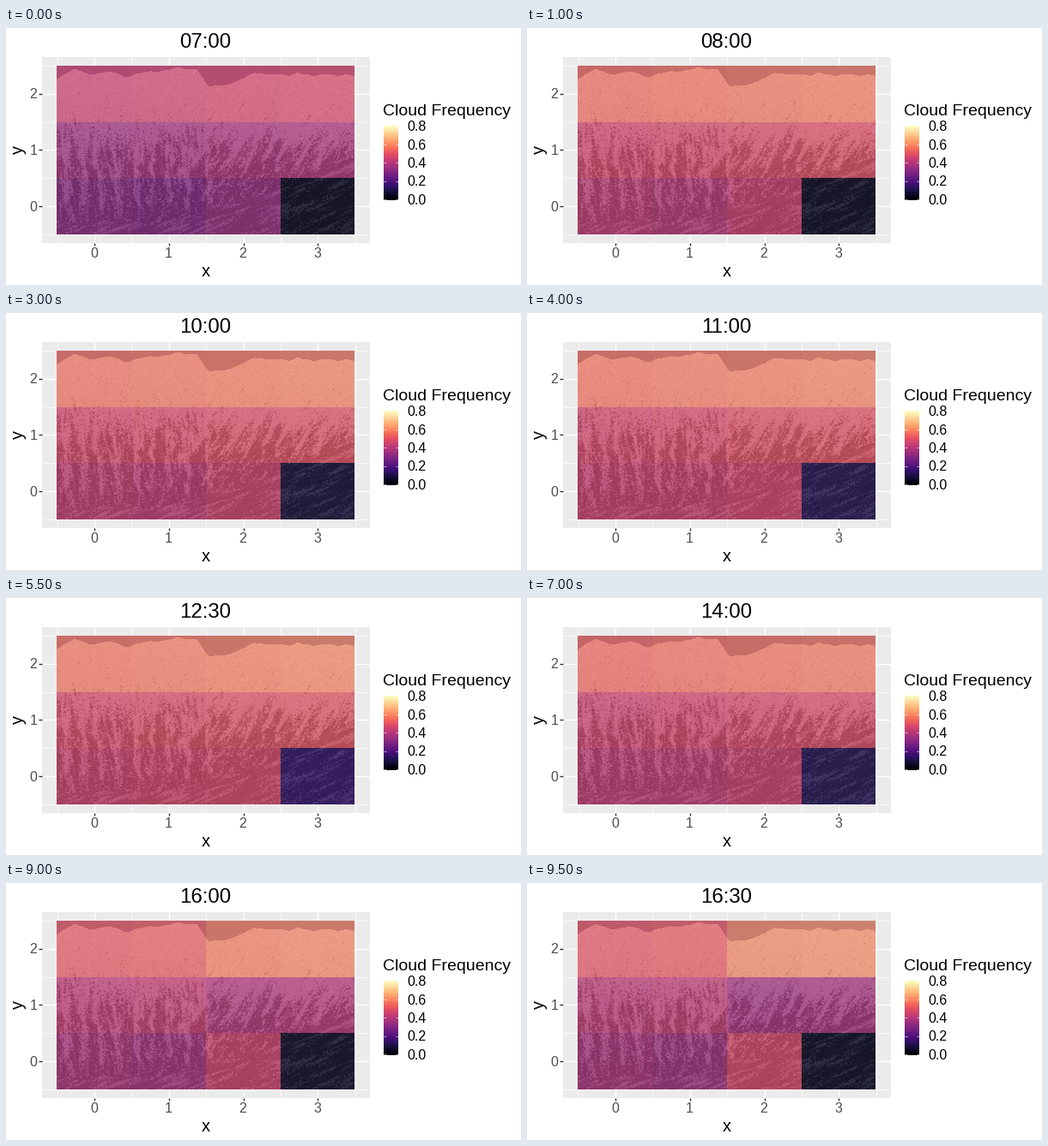
A matplotlib script for the animation above (10000 ms loop, 600x300 px).

```python
import numpy as np
import matplotlib
import matplotlib.pyplot as plt
from matplotlib.animation import FuncAnimation

W, H, DPI = 600, 300, 100
PX = 72 / DPI                      # points per pixel
FRAMES, INTERVAL = 20, 500
LEFT, TOP, COLS, ROWS = 59, 44, 347, 197
CELL_W, CELL_H = 86.8, 65.6
ALPHA = 0.7

plt.rcParams["font.family"] = "Liberation Sans"
magma = matplotlib.colormaps["magma"]
rng = np.random.default_rng(7)

x = np.arange(COLS)[None, :] + LEFT + .5
y = np.arange(ROWS)[:, None] + TOP + .5
col = ((x[0] - 59.5) / CELL_W).clip(0, 3).astype(int)
row = ((y[:, 0] - 44.1) / CELL_H).clip(0, 2).astype(int)


def noise(length, width, angle=0):
    """Unit-variance noise made of streaks running at an angle in degrees."""
    fy = np.fft.fftfreq(ROWS)[:, None]
    fx = np.fft.fftfreq(COLS)[None, :]
    c, s = np.cos(np.radians(angle)), np.sin(np.radians(angle))
    keep = np.exp(-20 * ((length * (fx * c + fy * s)) ** 2
                         + (width * (fy * c - fx * s)) ** 2))
    field = np.fft.ifft2(np.fft.fft2(rng.normal(size=(ROWS, COLS))) * keep).real
    return field / field.std()


def sigmoid(v):
    return 1 / (1 + np.exp(-v))


def mountain():
    """RGB picture of a snowy range above dark rock and scree."""
    grain, wobble = noise(.4, .4), 2 * noise(8, 5)
    ridge = np.interp(x, [59, 80, 97, 122, 138, 185, 222, 236, 262, 290, 328, 360, 406],
                      [60, 47, 54, 51, 57, 48, 49, 67, 66, 51, 56, 53, 56]) + noise(4, 1)[0]

    # Snow thins out downhill; dark buttresses widen below evenly spaced apexes.
    cover = 1.5 - 2.2 * sigmoid((y - 120) / 16)
    apex_distance = abs((x - 96) % 60 - 30)
    cover = cover + .45 * sigmoid((apex_distance - .45 * (y - 100)) / 3) * (y < 160)

    # Gullies run straight down in the west and lean back in the east.
    for top_x in np.arange(68, 390, 20) + rng.uniform(-5, 5, 17):
        east = top_x > 235
        start, end = (105, 175) if east else (130, 222)
        drift = -35 if east else rng.uniform(-5, 10)
        t = (y - start) / (end - start)
        inside = np.clip(8 * t, 0, 1) * np.clip(5 * (1 - t), 0, 1)
        offset = x - (top_x + drift * t) + wobble
        cover += 1.2 * inside * np.exp(-(offset / rng.uniform(2.5, 4.5)) ** 2)

    slope = np.where(x < 235, noise(5, 1, 85), noise(5, 1, 125))
    snow = sigmoid(4 * (cover + .4 * slope + .45 * grain))
    light = np.interp(y, [44, 110, 241], [208, 195, 150])
    dark = np.interp(y, [44, 110, 160, 241], [120, 80, 58, 50])
    tone = dark + (light - dark) * snow + 7 * grain

    foot = 226 - 75 * ((x - 130).clip(0) / 276) ** 1.6
    scree = .7 * noise(7, 1, -22) + .6 * grain
    ground = 58 + 80 * sigmoid(5 * (scree - .55))
    tone = np.where(y > foot + wobble, ground, tone)

    rock = tone[..., None] * [.97, .98, 1.05]
    rgb = np.where((y < ridge)[..., None], [88, 94, 130], rock)
    return np.clip(rgb, 15, 235) / 255


photo = mountain()


def levels(hour):
    """Colour-scale position of the 3 x 4 cells, top row first."""
    r, c = np.mgrid[:3, :4]
    day = np.interp(hour, [7, 8, 12.5, 16.5], [0, .9, 1, .5])
    noon = np.exp(-((hour - 12.5) / 2.5) ** 2)
    late = np.clip((hour - 15) / 1.5, 0, 1)
    base = np.array([.59, .48, .45])[r]
    value = base + .14 * day + .012 * (c - 1.5)
    value -= .06 * (1 - noon) * (r == 2) * np.exp(-(c - 1) ** 2)
    value += .09 * late * (c >= 2) * (-1.0) ** r
    value[2, 3] = .05 + .13 * noon
    return value


def picture(hour):
    tint = magma(levels(hour))[..., :3]
    return ALPHA * tint[row[:, None], col[None, :]] + (1 - ALPHA) * photo


fig = plt.figure(figsize=(W / DPI, H / DPI), dpi=DPI, facecolor="white")
ax = fig.add_axes([0, 0, 1, 1])


def line(xs, ys, color, width, z=2):
    ax.plot(xs, ys, color=color, lw=width * PX, zorder=z, solid_capstyle="butt")


def label(lx, ly, s, size, color="black", ha="center", **kw):
    return ax.text(lx, ly, s, fontsize=size * PX, color=color, ha=ha,
                   va="baseline", **kw)


# Panel, grid and axes
X0, X1, Y0, Y1 = 42, 424, 34, 250.5
ax.add_patch(plt.Rectangle((X0, Y0), X1 - X0, Y1 - Y0, fc="#EBEBEB", lw=0))
for i in range(9):
    gx = 59.5 + i * CELL_W / 2
    line([gx, gx], [Y0, Y1], "white", 1.4 if i % 2 else .7)
for i in range(7):
    gy = 240.7 - i * CELL_H / 2
    line([X0, X1], [gy, gy], "white", 1.4 if i % 2 else .7)
for i in range(4):
    tx = 102.9 + i * CELL_W
    line([tx, tx], [Y1, Y1 + 3.7], "#333333", 1.4)
    label(tx - .4, 268, str(i), 16, "#4D4D4D")
for i in range(3):
    ty = 207.9 - i * CELL_H
    line([X0 - 3.7, X0], [ty, ty], "#333333", 1.4)
    label(36.5, ty + 5.7, str(i), 16, "#4D4D4D", "right")
label(232.7, 289.5, "x", 20)
label(20, 142, "y", 20, rotation=90, rotation_mode="anchor")
title = label(232.4, 23, "", 24)

# Legend
label(439.3, 102, "Cloud Frequency", 19.5, ha="left")
ax.imshow(np.linspace(1, 0, 87)[:, None], cmap=magma, vmin=0, vmax=1,
          extent=(440, 457, 201, 114), aspect="auto", zorder=3)
for i in range(5):
    ky = 200.3 - i * 21.5
    line([440, 443.4], [ky, ky], "white", .6, 4)
    line([453.6, 457], [ky, ky], "white", .6, 4)
    label(467, ky + 5.7, f"{i * .2:.1f}", 16, ha="left")

image = ax.imshow(picture(7), extent=(LEFT, LEFT + COLS, TOP + ROWS, TOP),
                  interpolation="nearest", aspect="auto", zorder=3)
ax.set(xlim=(0, W), ylim=(H, 0))
ax.axis("off")


def update(frame):
    hour = 7 + frame / 2
    title.set_text(f"{int(hour):02d}:{30 * (frame % 2):02d}")
    image.set_data(picture(hour))
    return title, image


anim = FuncAnimation(fig, update, frames=FRAMES, interval=INTERVAL,
                     repeat=True, repeat_delay=0)
plt.show()
```
